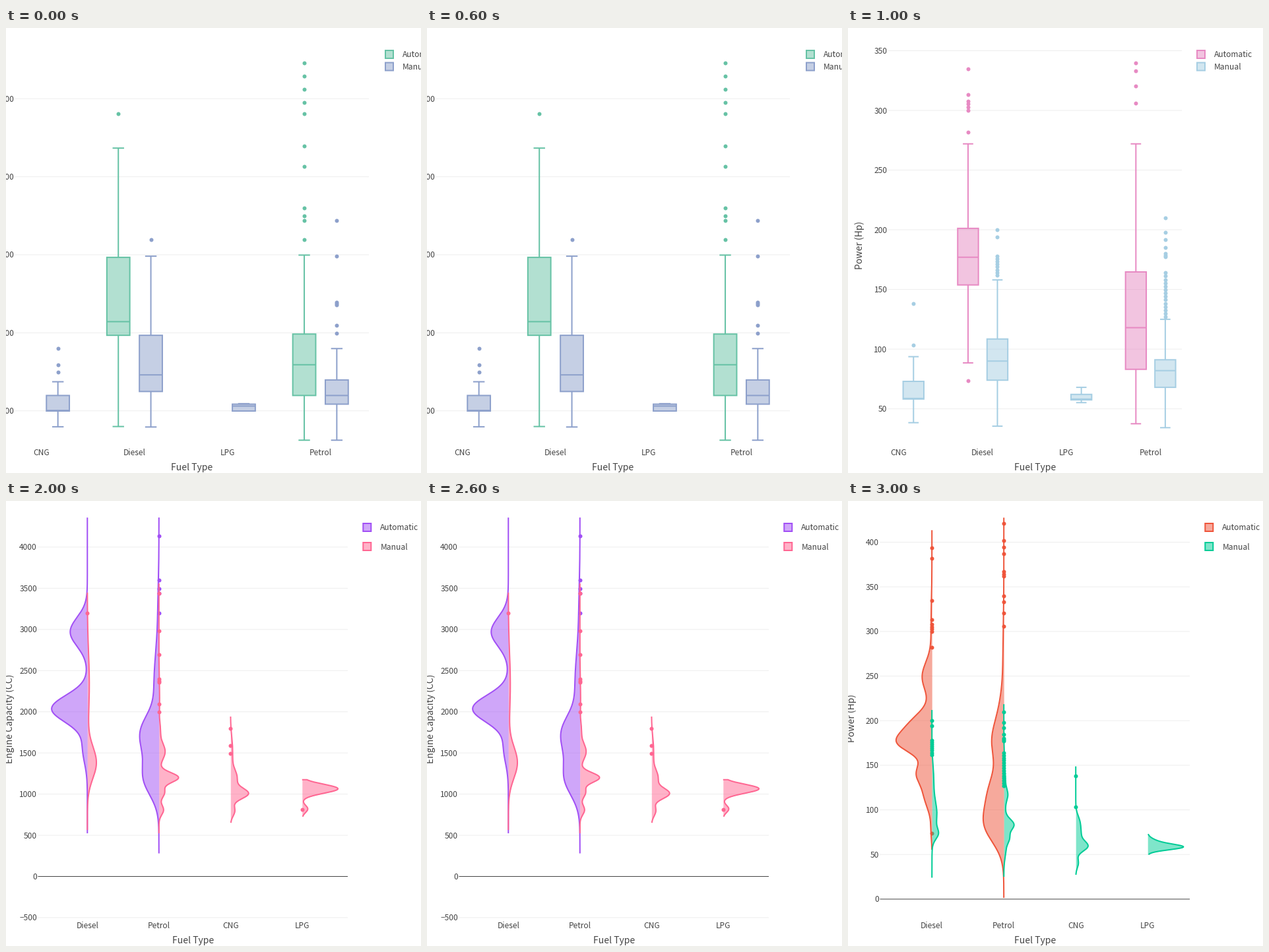
Write a matplotlib script that moves like this. It is 629x675 px and loops after 4 s.

```python
import numpy as np
import matplotlib.pyplot as plt
from matplotlib.animation import FuncAnimation
from matplotlib.patches import Rectangle

W, H, DPI = 629, 675, 100
PX = 72 / DPI
TOP = 25
INK, GRID = "#444444", "#eeeeee"
TEAL, SLATE = "#66c2a5", "#8da0cb"
ORCHID, SKY = "#e78ac3", "#a6cee3"
PURPLE, ROSE = "#a14ff5", "#ff6692"
RED, GREEN = "#ef553b", "#00cc96"
BOX_NAMES = ("CNG", "Diesel", "LPG", "Petrol")
VIOLIN_NAMES = ("Diesel", "Petrol", "CNG", "LPG")

plt.rcParams["font.family"] = "Noto Sans CJK JP"
plt.rcParams["path.snap"] = False
fig = plt.figure(figsize=(W / DPI, H / DPI), dpi=DPI, facecolor="white")
ax = fig.add_axes([0, 0, 1, 1])


def spread(*parts):
    """Single values, or (low, high, count) for an even run."""
    return np.hstack([np.linspace(*p) if isinstance(p, tuple) else p
                      for p in parts])


ENGINE_AUTO = {
    "Diesel": spread(4806),
    "Petrol": spread((4950, 5461, 4), 4806, 4396, 4134, 3598, 3498, 3437, 3198)}
ENGINE_MANUAL = {
    "Diesel": spread(3198),
    "Petrol": spread(3437, 2985, (2354, 2394, 3), 2094, 1997),
    "CNG": spread(1798, 1586, 1495)}
POWER_AUTO = {
    "Diesel": spread(394, 382, 335, 313, (300, 308, 4), 282, 73.8),
    "Petrol": spread(421, 402, 394.6, 387, (362, 367, 3), 340, 333, 320.5, 306)}
POWER_MANUAL = {
    "Diesel": spread(200, 194, (162, 178, 8)),
    "Petrol": spread(210, 198, 192, 185, (177.5, 180, 3), (127, 164, 14)),
    "CNG": spread(138, 103.3)}


def label(x, y, text, size=12, **kw):
    ax.text(x, y, text, fontsize=size * PX, color=INK, va="baseline",
            rotation_mode="anchor", **kw)


def segment(xs, ys, color, width=2):
    ax.plot(xs, ys, color=color, lw=width * PX, zorder=2,
            solid_capstyle="butt")


def tinted_box(x, y, w, h, color):
    ax.add_patch(Rectangle((x, y), w, h, fc=color, alpha=0.5, lw=0, zorder=2))
    ax.add_patch(Rectangle((x, y), w, h, fill=False, ec=color, lw=2 * PX,
                           zorder=2))


def legend(x, ys, colors):
    for y, color, name in zip(ys, colors, ("Automatic", "Manual")):
        tinted_box(x, y - 6, 12, 12, color)
        label(x + 26, y + 4.5, name)


class Chart:
    """Maps categories and values to pixels and draws the axes."""

    def __init__(self, names, x0, dx, y0, scale, ticks, left, right, title_x):
        self.names, self.x0, self.dx = names, x0, dx
        self.y0, self.scale = y0, scale
        for tick in ticks:
            y = self.y(tick)
            zero = tick == 0
            segment([left, right], [y, y], INK if zero else GRID, 1)
            label(left - 1.5, y + 4.5, str(tick).replace("-", "\u2212"),
                  ha="right")
        for name in names:
            label(self.x(name), 648.3, name, ha="center")
        label(title_x, 671, "Fuel Type", 14, ha="center")

    def x(self, name):
        return self.x0 + self.names.index(name) * self.dx

    def y(self, value):
        return self.y0 - np.asarray(value) * self.scale

    def y_title(self, x, text):
        label(x, 330, text, 14, ha="center", rotation=90)

    def dots(self, x, values, color):
        ys = self.y(values)
        ys = ys[ys >= TOP]
        ax.scatter(np.full(len(ys), x), ys, s=(6 * PX) ** 2, color=color, lw=0,
                   zorder=2)

    def box(self, name, side, color, low, q1, median, q3, high, outliers):
        x = self.x(name) + side * 0.175 * self.dx
        half = self.dx / 8.1
        low, q1, median, q3, high = self.y([low, q1, median, q3, high])
        for end, hinge in ((low, q1), (high, q3)):
            if end != hinge:
                segment([x, x], [hinge, end], color)
                segment([x - half / 2, x + half / 2], [end, end], color)
        tinted_box(x - half, q3, 2 * half, q1 - q3, color)
        segment([x - half, x + half], [median, median], color)
        self.dots(x, outliers.get(name, []), color)

    def violin(self, name, side, color, low, high, bumps, outliers=()):
        """Half violin as a sum of (centre, spread, width) bell curves."""
        x = self.x(name)
        value = np.linspace(low, high, 900)
        value = value[self.y(value) >= TOP]
        width = sum(w * np.exp(-((value - c) / s) ** 2 / 2)
                    for c, s, w in bumps)
        if width[-1] > 2:
            value, width = np.r_[value, value[-1]], np.r_[width, 0]
        y, edge = self.y(value), x + side * width
        ax.fill_betweenx(y, x, edge, color=color, alpha=0.5, lw=0, zorder=2)
        segment(edge, y, color)
        self.dots(x, outliers, color)


def engine_boxes():
    c = Chart(BOX_NAMES, 54, 140.9, 699.1, 0.11837, range(1000, 6000, 1000),
              14, 550, 281.7)
    legend(575, (40, 58.5), (TEAL, SLATE))
    auto, manual = (-1, TEAL), (1, SLATE)
    c.box("Diesel", *auto, 799, 1968, 2143, 2967, 4367, ENGINE_AUTO)
    c.box("Petrol", *auto, 624, 1197, 1591, 1984, 2996, ENGINE_AUTO)
    c.box("CNG", *manual, 796, 998, 1005, 1197, 1373, ENGINE_MANUAL)
    c.box("Diesel", *manual, 793, 1248, 1461, 1968, 2982, ENGINE_MANUAL)
    c.box("LPG", *manual, 998, 998, 1061, 1086, 1092, ENGINE_MANUAL)
    c.box("Petrol", *manual, 624, 1086, 1197, 1396, 1798, ENGINE_MANUAL)


def power_boxes():
    c = Chart(BOX_NAMES, 77, 127.2, 668.2, 1.8106, range(50, 351, 50),
              61, 506, 283.3)
    c.y_title(22, "Power (Hp)")
    legend(529, (40, 58.5), (ORCHID, SKY))
    auto, manual = (-1, ORCHID), (1, SKY)
    c.box("Diesel", *auto, 88.5, 153.8, 177, 201.2, 272, POWER_AUTO)
    c.box("Petrol", *auto, 37.5, 83.1, 118, 164.7, 272, POWER_AUTO)
    c.box("CNG", *manual, 38.4, 58.2, 58.7, 73, 93.7, POWER_MANUAL)
    c.box("Diesel", *manual, 35.5, 74, 90, 108.5, 158, POWER_MANUAL)
    c.box("LPG", *manual, 55.2, 57.5, 58.2, 62.1, 68, POWER_MANUAL)
    c.box("Petrol", *manual, 34.2, 68, 82, 91.1, 125, POWER_MANUAL)


def engine_violins():
    c = Chart(VIOLIN_NAMES, 123.3, 108.5, 569.5, 0.1249,
              range(-500, 4001, 500), 48.5, 518, 283.3)
    c.y_title(10, "Engine Capacity (CC)")
    legend(541.3, (40, 69), (PURPLE, ROSE))
    auto, manual = (-1, PURPLE), (1, ROSE)
    c.violin("Diesel", *auto, 524, 4500,
             [(2970, 175, 26), (2037, 163, 54), (1550, 176, 7)],
             ENGINE_AUTO["Diesel"])
    c.violin("Petrol", *auto, 280, 4500,
             [(1189, 208, 22), (1557, 192, 13), (1797, 192, 20),
              (2278, 280, 6), (2678, 280, 3), (3279, 320, 1.5)],
             ENGINE_AUTO["Petrol"])
    c.violin("Diesel", *manual, 564, 3447, [(1381, 192, 13.6), (2330, 380, 3)],
             ENGINE_MANUAL["Diesel"])
    c.violin("Petrol", *manual, 524, 3559,
             [(1201, 60, 29.5), (1517, 100, 9.4), (1020, 64, 8.5),
              (808, 60, 7), (1781, 80, 2), (2158, 200, 1)],
             spread(ENGINE_MANUAL["Petrol"], 2694))
    c.violin("CNG", *manual, 652, 1942,
             [(1005, 64, 26), (1197, 96, 9.5), (797, 64, 6.5), (1517, 160, 3.3)],
             ENGINE_MANUAL["CNG"])
    c.violin("LPG", *manual, 727, 1175, [(1065, 55, 54.3), (820, 44, 8.6)],
             spread(815))


def power_violins():
    c = Chart(VIOLIN_NAMES, 127.2, 109, 603.9, 1.3534, range(0, 401, 50),
              48.5, 518, 283.3)
    c.y_title(10, "Power (Hp)")
    legend(541.3, (40, 69), (RED, GREEN))
    auto, manual = (-1, RED), (1, GREEN)
    c.violin("Diesel", *auto, 55.3, 413.5,
             [(173.6, 11, 38), (193.5, 14.8, 33), (141.8, 11.8, 21),
              (116, 14.5, 11), (249, 16.5, 14.7), (306, 26, 1.4),
              (77, 10, 1.3)], POWER_AUTO["Diesel"])
    c.violin("Petrol", *auto, 1.4, 428,
             [(82.7, 20, 26.5), (121, 20.7, 20), (176.5, 22, 17),
              (213.5, 20.7, 4), (261, 37, 1.5)], POWER_AUTO["Petrol"])
    c.violin("Diesel", *manual, 24, 212,
             [(73, 6, 7), (95, 16, 7.5), (136, 15, 2.5)],
             POWER_MANUAL["Diesel"])
    c.violin("Petrol", *manual, 25, 218.5,
             [(83.4, 6, 13.5), (68.6, 6, 7), (117, 6, 3.5), (128, 22, 2.5),
              (92, 16, 1.5), (54.6, 9, 2.7)], POWER_MANUAL["Petrol"])
    c.violin("CNG", *manual, 27.3, 148.8,
             [(59, 5.5, 16), (73, 9.5, 7.5), (88, 7, 4), (40.5, 5.5, 4)],
             POWER_MANUAL["CNG"])
    c.violin("LPG", *manual, 50, 73, [(58.2, 3.1, 48), (63.5, 4, 14)])


SCENES = (engine_boxes, power_boxes, engine_violins, power_violins)


def draw(index):
    ax.clear()
    ax.set(xlim=(0, W), ylim=(H, 0))
    ax.axis("off")
    SCENES[index]()
    return []


anim = FuncAnimation(fig, draw, frames=len(SCENES), interval=1000, repeat=True)
plt.show()
```
